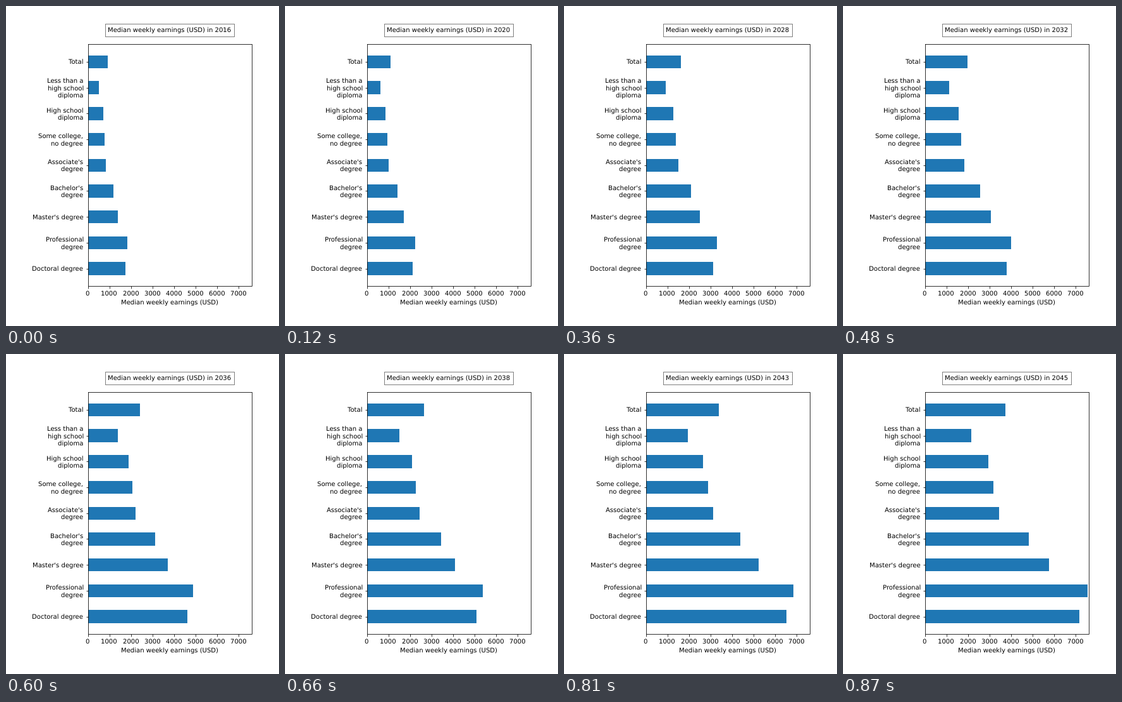
Recreate the animation shown at these times as an HTML page with a canvas. Size 432 px wide and 504 px high, loop 900 ms.

```html
<!DOCTYPE html>
<html lang="en">
<head>
<meta charset="utf-8">
<title>Median weekly earnings</title>
<style>
  html, body { margin: 0; width: 100%; height: 100%; overflow: hidden; background: #fff; }
  canvas { display: block; width: 432px; height: 504px; }
</style>
</head>
<body>
<canvas id="chart" width="432" height="504"></canvas>
<script>
const ctx = document.getElementById('chart').getContext('2d');

const LOOP = 900, STEP = 30, FIRST_YEAR = 2016, GROWTH = 1.05;
const AXES = { left: 129.6, right: 388.8, top: 60.48, bottom: 441 };
const X_MAX = 7600;
const ROW = (AXES.bottom - AXES.top) / 9.35;
const FIRST_ROW = AXES.top + ROW * 0.675;
const MID_X = (AXES.left + AXES.right) / 2;
const ASCENT = 7.75, DESCENT = 2.2, LINE = 11.32;

const groups = [
  ['Total', 907],
  ['Less than a\nhigh school\ndiploma', 520],
  ['High school\ndiploma', 712],
  ['Some college,\nno degree', 774],
  ["Associate's\ndegree", 836],
  ["Bachelor's\ndegree", 1173],
  ["Master's degree", 1401],
  ['Professional\ndegree', 1836],
  ['Doctoral degree', 1743]
];

const toX = value => AXES.left + value / X_MAX * (AXES.right - AXES.left);
const rowY = i => FIRST_ROW + i * ROW;

// Aligns the inked width (0.5 centre, 1 right) and starts on a whole pixel.
function text(str, x, y, align) {
  const box = ctx.measureText(str);
  const bearing = -box.actualBoundingBoxLeft;
  const ink = box.actualBoundingBoxRight - bearing;
  const left = Math.floor(x - ink * align) - Math.floor(bearing + 0.05);
  ctx.fillText(str, left, Math.floor(y));
}

// Rows of text, right-aligned and centred on y.
function label(str, x, y) {
  const lines = str.split('\n');
  const extra = lines.length > 1 ? ASCENT + DESCENT + (lines.length - 2) * LINE : 0;
  const first = y + (ASCENT - extra) / 2;
  lines.forEach((part, n) => text(part, x, first + n * LINE, 1));
}

function line(x1, y1, x2, y2) {
  ctx.beginPath();
  ctx.moveTo(x1 + 0.5, y1 + 0.5);
  ctx.lineTo(x2 + 0.5, y2 + 0.5);
  ctx.stroke();
}

function drawBars(growth) {
  ctx.fillStyle = '#1f77b4';
  const left = Math.round(AXES.left);
  groups.forEach(([, base], i) => {
    const top = Math.round(rowY(i) - ROW / 4);
    const bottom = Math.round(rowY(i) + ROW / 4);
    ctx.fillRect(left, top, Math.round(toX(base * growth)) - left, bottom - top);
  });
}

function drawAxes() {
  const [l, r, t, b] = [AXES.left, AXES.right, AXES.top, AXES.bottom].map(Math.round);
  ctx.strokeStyle = '#000';
  ctx.fillStyle = '#000';
  ctx.lineWidth = 0.8;
  ctx.strokeRect(l + 0.5, t + 0.5, r - l, b - t);

  for (let value = 0; value <= 7000; value += 1000) {
    const x = Math.round(toX(value));
    line(x, b, x, b + 4);
    text(String(value), toX(value), b + 15, 0.5);
  }

  groups.forEach(([name], i) => {
    const y = Math.round(rowY(i));
    line(l - 3, y, l, y);
    label(name, AXES.left - 7, rowY(i));
  });

  text('Median weekly earnings (USD)', MID_X, 470, 0.5);
}

function drawTitle(year) {
  ctx.lineWidth = 1;
  ctx.strokeStyle = 'rgba(0, 0, 0, 0.5)';
  ctx.strokeRect(157.5, 28.5, 204, 20);
  text('Median weekly earnings (USD) in ' + year, MID_X, 41, 0.5);
}

function draw(time) {
  const step = Math.floor(time % LOOP / STEP);
  ctx.fillStyle = '#fff';
  ctx.fillRect(0, 0, 432, 504);
  ctx.font = '10.06px "DejaVu Sans", sans-serif';
  ctx.textRendering = 'geometricPrecision';
  drawBars(GROWTH ** step);
  drawAxes();
  drawTitle(FIRST_YEAR + step);
}

const start = performance.now();
function tick() {
  draw(performance.now() - start);
  requestAnimationFrame(tick);
}
tick();
</script>
</body>
</html>
```
